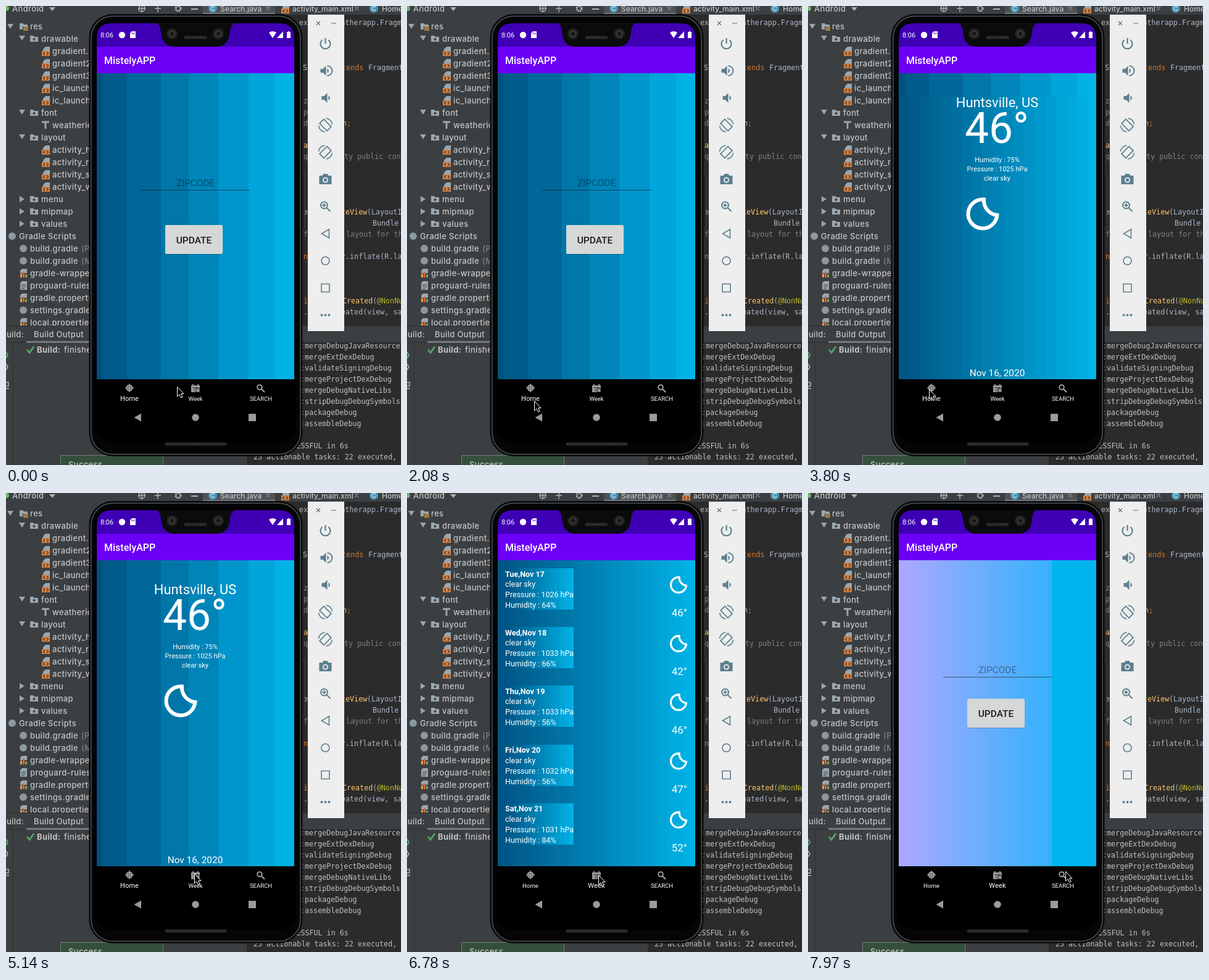
Recreate the animation shown at these times as an HTML page. Size 640 by 744 pixels, loop 8000 ms.

```html
<!DOCTYPE html>
<html lang="en">
<head>
<meta charset="utf-8">
<title>Weather app in an emulator</title>
<style>
html, body { margin: 0; width: 100%; height: 100%; overflow: hidden; background: #3c3f41 }
svg { display: block }
text { white-space: pre }
.ide { font: 500 13px Inter, sans-serif; letter-spacing: .35px; fill: #c3c5c7 }
.code { font: 11.7px "DejaVu Sans Mono", monospace }
.app { font-family: Roboto, sans-serif; fill: #fff }
</style>
</head>
<body>
<svg id="stage" width="640" height="744" viewBox="0 0 640 744"></svg>
<script>
const rect = (x, y, w, h, fill, more = '') =>
  `<rect x="${x}" y="${y}" width="${w}" height="${h}" fill="${fill}" ${more}/>`;
const circle = (x, y, r, fill, more = '') =>
  `<circle cx="${x}" cy="${y}" r="${r}" fill="${fill}" ${more}/>`;
const shape = (d, fill, more = '') => `<path d="${d}" fill="${fill}" ${more}/>`;
const line = (d, color, width = 1, more = '') =>
  `<path d="${d}" fill="none" stroke="${color}" stroke-width="${width}" ${more}/>`;
const group = (cls, body, more = '') => `<g class="${cls}" ${more}>${body}</g>`;
const at = (x, y, body) => `<g transform="translate(${x} ${y})">${body}</g>`;
const text = (x, y, str, more = '') => `<text x="${x}" y="${y}" ${more}>${str}</text>`;
const label = (x, y, str, size, more = '') =>
  text(x, y, str, `font-size="${size}" text-anchor="middle" ${more}`);

// Stepped horizontal gradient between two [r, g, b] colours
function bands(x, y, w, h, from, to, step) {
  let out = '';
  for (let dx = 0; dx < w; dx += step) {
    const k = Math.min(1, (dx + step / 2) / w);
    const rgb = from.map((c, i) => Math.round(c + (to[i] - c) * k));
    out += rect(x + dx, y, Math.min(step, w - dx), h, `rgb(${rgb})`);
  }
  return `<g shape-rendering="crispEdges">${out}</g>`;
}
const DEEP = [0, 83, 130], SKY = [0, 180, 232];

// ---- IDE behind the phone ----
const folder = y => at(39, y, shape('M0-5H5L7-3H13V5H0Z', '#9aa7b0') + circle(6.5, 1, 2, '#3c3f41'));
const file = (x, y) => at(x, y,
  shape('M6-7H13V0H2V-3Z', '#9aa7b0') + rect(0, 0, 13, 8, '#d9803f') +
  line('M5 1.5L2.5 4L5 6.5M8 1.5L10.5 4L8 6.5', '#3c3f41', 1.2));
const chart = y => at(22, y,
  shape('M4-7H12V0H1V-4Z', '#9aa7b0') + rect(1, 1, 3, 6, '#e0a44a') +
  rect(5, -2, 3, 9, '#d9603f') + rect(9, 2, 3, 5, '#76a95b'));
const arrow = (x, y, open) => shape(open
  ? `M${x - 5} ${y - 4}h10l-5 8z` : `M${x - 3} ${y - 5}v10l8-5z`, '#a0a3a5');

function projectTree() {
  const rows = [
    ['root', 'res'], ['open', 'drawable'],
    ['xml', 'gradient.'], ['xml', 'gradient2'], ['xml', 'gradient3'], ['xml', 'ic_launch'], ['xml', 'ic_launch'],
    ['open', 'font'], ['type', 'weathericons'], ['open', 'layout'],
    ['xml', 'activity_h'], ['xml', 'activity_r'], ['xml', 'activity_s'], ['xml', 'activity_w'],
    ['shut', 'menu'], ['shut', 'mipmap'], ['shut', 'values'],
    ['scripts', 'Gradle Scripts'], ['build', 'build.gradle', '(P'], ['build', 'build.gradle', '(M'],
    ['chart', 'gradle-wrapper'], ['page', 'proguard-rules'], ['chart', 'gradle.properties'],
    ['build', 'settings.gradle'], ['chart', 'local.properties']
  ];
  const textX = { xml: 75, type: 75, open: 57, shut: 57, scripts: 21 };
  const icon = {
    root: y => arrow(7, y, true) + at(22, y, shape('M0-5H5L7-3H13V5H0Z', '#9aa7b0') +
      rect(5, 0, 10, 7, '#3c3f41') + line('M6 1H14M6 3.5H14M6 6H14', '#d9a343', 1.4)),
    open: y => arrow(26, y - 1, true) + folder(y),
    shut: y => arrow(25, y, false) + folder(y),
    xml: y => file(58, y),
    type: y => line(`M58 ${y - 5}H70M64 ${y - 5}V${y + 6}`, '#9aa7b0', 3),
    scripts: y => circle(10, y, 6, '#8b989f'),
    build: y => circle(28, y, 6, '#8b989f'),
    chart,
    page: y => at(22, y, shape('M4-7H12V7H1V-4Z', '#9aa7b0') + line('M3-1H10M3 2H10M3 5H8', '#3c3f41'))
  };
  return rows.map(([kind, name, tail], i) => {
    const y = 33 + i * 20;
    return icon[kind](y) + text(textX[kind] || 39, y + 5, name) +
      (tail ? text(122, y + 5, tail, 'fill="#7d8083"') : '');
  }).join('');
}

function codeLines() {
  const C = { w: '#a9b7c6', o: '#cc7832', g: '#808080', y: '#ffc66d', a: '#bbb529', log: '#c0c0c0' };
  const lines = [
    [27, 475, 'w', 'ex'], [27, 542.5, 'w', 'atherapp.Fragm'],
    [100, 481, 'w', 'S'], [100, 530, 'o', 'extends'], [100, 587, 'w', 'Fragment'],
    [154, 482, 'g', 'z'], [172, 482, 'g', 'p'], [190, 482, 'g', 'd'],
    [190, 545, 'w', 'n'], [190, 552, 'o', ';'],
    [226, 482, 'y', 'a'], [244, 482, 'g', 'q'], [244, 541, 'g', 'pty public con'],
    [334, 482, 'w', 'e'], [334, 543, 'y', 'teView'], [334, 585, 'w', '(LayoutI'],
    [352, 594, 'w', 'Bundle'], [370, 482, 'g', 'f'], [370, 551, 'g', 'layout for th'],
    [406, 482, 'o', 'n'], [406, 543, 'w', 'r.inflate(R.la'],
    [478, 482, 'o', 'i'], [478, 545, 'y', 'Created'], [478, 594, 'w', '('], [478, 601, 'a', '@NonNu'],
    [496, 482, 'w', '.'], [496, 543, 'w', 'eated(view, sa']
  ];
  const tasks = ['mergeDebugJavaResource', 'mergeExtDexDebug', 'validateSigningDebug',
    'mergeProjectDexDebug', 'mergeDebugNativeLibs', 'stripDebugDebugSymbols', 'packageDebug', 'assembleDebug'];
  tasks.forEach((task, i) => lines.push([551 + 18 * i, 477, 'log', ':' + task]));
  lines.push([713, 400, 'log', 'BUILD SUCCESSFUL in 6s'], [731, 401, 'log', '25 actionable tasks: 22 executed,']);
  return group('code', lines.map(([y, x, c, str]) => text(x, y + 4, str, `fill="${C[c]}"`)).join(''));
}

function ide() {
  const grey = '#afb1b3';
  return rect(0, 0, 640, 744, '#3c3f41') +
    rect(400, 14, 240, 504, '#2b2b2b') + rect(390, 546, 250, 198, '#2b2b2b') +
    rect(319, 0, 117, 11, '#4e5254') + rect(319, 11, 117, 3, '#747a80') +
    group('ide',
      circle(1, 4, 4, '#72b66b') + text(10, 9, 'Android') + shape('M70 2h10l-5 6z', grey) +
      circle(220, 4, 5, 'none', `stroke="${grey}" stroke-width="1.5"`) +
      line('M214 4H226M220-2V10M241 4H251M246-1V10', grey, 1.4) +
      circle(279, 4, 4, 'none', `stroke="${grey}" stroke-width="3" stroke-dasharray="2.2 1"`) +
      line('M300 5H311', grey, 2) +
      circle(335, 4, 7, '#4595b8') + label(335, 8, 'C', 11, 'fill="#dce9ee"') +
      text(347, 9, 'Search.java', 'font-size="12" style="letter-spacing:0"') +
      line('M422 1l6 6m0-6l-6 6M565 1l6 6m0-6l-6 6', '#8c9092', 1.2) +
      file(446, 4) + text(464, 9, 'activity_main.xml', 'font-size="12" style="letter-spacing:0"') +
      circle(596, 4, 7, '#4595b8') + label(596, 8, 'C', 11, 'fill="#dce9ee"') +
      text(609, 9, 'Home', 'font-size="12" style="letter-spacing:0"') +
      projectTree() +
      rect(0, 518, 640, 28, '#3c3f41') + line('M0 518.5H640M0 545.5H640M11.5 546V744', '#2d2f31') +
      text(-8, 537, 'Build:') + text(45, 537, 'Build Output') + rect(33, 543, 108, 3, '#747a80') +
      line('M34 557L38 562L45 552', '#59a869', 2.6) +
      text(50, 562, 'Build:', 'font-weight="700"') + text(94, 562, 'finished') +
      line('M0 561L3 566L0 571', '#59a869', 2) + line('M0 580L3 585L0 590M0 610h4v6h-4M0 620h5', grey, 1.5) +
      rect(88.5, 728.5, 166, 20, '#344f3b', 'stroke="#6b8270"') + text(101, 748, 'Success')) +
    codeLines();
}

function emulatorPanel() {
  const ink = '#5c7f8e';
  const speaker = 'M-8-3H-4L1-8V8L-4 3H-8Z';
  const rotate = flip => `<g transform="scale(${flip} 1)">` +
    rect(-4.8, -8.5, 9.6, 17, 'none', `stroke="${ink}" stroke-width="1.8" transform="rotate(-45)"`) +
    line('M1-11A11 11 0 0 1 11-1M-11 1A11 11 0 0 0-1 11', ink, 1.6) + '</g>';
  const icons = [
    line('M-5-6A8 8 0 1 0 5-6M0-9V0', ink, 2.2),
    shape(speaker, ink) + shape('M3-4A4.5 4.5 0 0 1 3 4Z', ink) + line('M3-8A8 8 0 0 1 3 8', ink, 2),
    shape(speaker, ink, 'transform="translate(2 0)"') + shape('M5-4A4.5 4.5 0 0 1 5 4Z', ink),
    rotate(1), rotate(-1),
    shape('M-10-6H-5L-3-9H3L5-6H10V8H-10Z', ink) + circle(0, 1, 4.5, '#eee') + circle(0, 1, 2.7, ink),
    circle(-2, -2, 5.5, 'none', `stroke="${ink}" stroke-width="2"`) + line('M2 2L8 8M-5-2H1M-2-5V1', ink, 2),
    line('M6-7V7L-6 0Z', ink, 1.6),
    circle(0, 0, 6.5, 'none', `stroke="${ink}" stroke-width="1.6"`),
    line('M-6.5-6.5H6.5V6.5H-6.5Z', ink, 1.6),
    [-6, 0, 6].map(x => circle(x, 0, 2, ink)).join('')
  ];
  return rect(489, 14, 59, 513, '#eeeeee') +
    line('M503 25l6 6m0-6l-6 6M527 28h8', '#56727e', 1.2) +
    icons.map((icon, i) => at(517.5, 61 + 44 * i, icon)).join('');
}

// ---- phone ----
function phone() {
  const lens = x => circle(x, 45, 9, '#20201f') + circle(x, 45, 6, '#35322f') + circle(x, 45, 3, '#151515');
  const grille = (x, y, w) => rect(x, y, w, 6, '#191919', 'rx="2"') +
    line(`M${x + 2} ${y + 3}h${w - 4}`, '#3b3b3b', 3, 'stroke-dasharray="2 1"');
  return rect(480, 272, 4, 88, '#1d1e20', 'stroke="#55585a" stroke-width=".7"') +
    rect(134.5, 13, 346, 717, '#0b0b0c', 'rx="38"') +
    rect(138, 16.5, 339, 710, '#050505', 'rx="35" stroke="#505254" stroke-width="1.5"') +
    rect(144, 24, 326, 684, '#000', 'rx="27"') +
    shape('M147 66V52Q147 28 171 28H443Q467 28 467 52V66Z', '#3f00b5') +
    shape('M240 27Q250 28 251 42Q253 66 274 66H340Q361 66 363 42Q364 28 374 27Z', '#0b0b0b') +
    rect(147, 66, 320, 43, '#6c00f7') +
    lens(269) + lens(344) + grille(288, 48, 38) + grille(257, 707, 101) +
    group('app',
      text(153, 51, '8:06', 'font-size="11"') + circle(188, 47, 5.2, '#fff') +
      shape('M204 41h6v11h-9v-8z', '#fff') + line('M204 43v3m2-3v3m2-3v3', '#3f00b5', .8) +
      shape('M426 43Q432 39 438 43L432 52Z', '#fff') + shape('M449 41V52H439Z', '#fff') +
      shape('M455 42h2v-1h2v1h2v10h-6z', '#fff') +
      text(159, 94, 'MistelyAPP', 'font-size="16" font-weight="500"'));
}

function navigation() {
  const ink = '#9b9b9b';
  return group('app',
    circle(200, 619, 4.5, '#686868', `stroke="${ink}" stroke-width="2"`) +
    line('M193 619h14M200 612v14', ink, 1.5) +
    shape('M300 615h14v11h-14z', ink) + line('M303 613v3m8-3v3', ink, 2) +
    line('M302 618.5h10M305 620v5', '#333', 1) + rect(308, 620, 6, 6, ink, 'stroke="#111"') +
    circle(411, 618, 3.8, 'none', `stroke="${ink}" stroke-width="2"`) + line('M414 621l5 5', ink, 2.4) +
    label(413, 640, 'SEARCH', 9.5) +
    `<g id="navHome">${label(200, 640, 'Home', 11.1) + label(307, 640, 'Week', 9.5)}</g>` +
    `<g id="navWeek">${label(200, 640, 'Home', 9.6) + label(307, 640, 'Week', 11.4)}</g>` +
    shape('M219 660.5V673.5L207.5 667Z', ink) + circle(307, 667, 5.8, ink) + rect(393, 661, 12, 12, ink));
}

const wideBands = () => {
  const edges = [147, 157, 196, 251, 296, 344, 393, 436, 467];
  const colors = ['#00527d', '#005a8a', '#006798', '#0077a8', '#0085b9', '#0096cb', '#00a5da', '#00b2e6'];
  return colors.map((c, i) => rect(edges[i], 109, edges[i + 1] - edges[i], 496, c)).join('');
};
const fineBands = step => bands(147, 109, 320, 496, DEEP, SKY, step);
const moon = (x, y, scale) => line('M2-23.5A23.5 23.5 0 1 0 23.4 2A24 24 0 0 1 2-23.5Z', '#fff', 6,
  `transform="translate(${x} ${y}) scale(${scale})"`);

const searchPage = buttonY =>
  label(307, 292, 'ZIPCODE', 15.3, 'fill="#000" fill-opacity=".4"') +
  rect(219, 298, 176, 1, '#000', 'fill-opacity=".5"') +
  rect(258, buttonY + 1, 93, 47, '#000', 'rx="2" fill-opacity=".25"') +
  rect(258, buttonY, 93, 47, '#d6d7d7', 'rx="2"') +
  label(304.5, buttonY + 29.5, 'UPDATE', 15.5, 'fill="#1c1c1c" font-weight="500"');

const homePage = () =>
  label(306.5, 164, 'Huntsville, US', 21.9) + label(306, 222, '46°', 69.5) +
  label(306.5, 253, 'Humidity : 75%', 11) + label(306.5, 268, 'Pressure : 1025 hPa', 11) +
  label(306.5, 283, 'clear sky', 11) + moon(283, 337, 1) + label(306.5, 600, 'Nov 16, 2020', 15.4);

const weekPage = () => [
  ['Tue,Nov 17', 1026, 64, 46], ['Wed,Nov 18', 1033, 66, 42], ['Thu,Nov 19', 1033, 56, 46],
  ['Fri,Nov 20', 1032, 56, 47], ['Sat,Nov 21', 1031, 84, 52]
].map(([day, pressure, humidity, temp], i) => at(0, 95.2 * i,
  bands(159, 122, 111, 67, DEEP, SKY, 8) +
  group('', text(159, 135.5, day, 'font-weight="700"') + text(159, 152, 'clear sky') +
    text(159, 169, `Pressure : ${pressure} hPa`) + text(159, 186, `Humidity : ${humidity}%`), 'font-size="12.5"') +
  moon(440, 149, .53) + text(454, 200, temp + '°', 'font-size="16.9" text-anchor="end"'))).join('');

// Each screen stays until the next one's start time
const screens = [
  [0, wideBands() + searchPage(355)],
  [2970, wideBands()],
  [3650, wideBands() + bands(147, 147, 320, 458, DEEP, SKY, 17) + homePage()],
  [3950, wideBands() + homePage()],
  [5890, fineBands(13) + weekPage()],
  [7970, bands(147, 109, 248, 496, [173, 168, 255], [52, 178, 252], 11) +
    rect(395, 109, 72, 496, '#00b4f0') + searchPage(333.5)]
];

// Pointer positions: time, x, y
const pointer = [
  [0, 277, 617], [140, 266, 618], [290, 232, 619], [440, 206, 618], [590, 197, 618],
  [2080, 206, 640], [2230, 219, 653], [2380, 213, 646], [2530, 200, 627], [2670, 196, 621],
  [3950, 205, 622], [4100, 243, 624], [4240, 284, 617], [4390, 299, 611],
  [4690, 301, 608], [4840, 304, 611], [4990, 305, 615], [5140, 305, 617],
  [6640, 310, 619], [6790, 328, 625], [6940, 355, 628], [7080, 384, 625],
  [7230, 405, 618], [7380, 414, 614], [7520, 417, 613]
];

const byId = id => document.getElementById(id);
byId('stage').innerHTML = ide() + phone() +
  screens.map(([, body], i) => group('app', body, `id="screen${i}"`)).join('') +
  navigation() + emulatorPanel() +
  `<path id="pointer" d="M.5.5V16L4 12.7L6.5 18L9 17L6.7 11.6H11Z" fill="#000" stroke="#fff"/>`;

const show = (id, on) => byId(id).setAttribute('visibility', on ? 'visible' : 'hidden');

function draw() {
  const t = performance.now() % 8000;
  const current = screens.findLastIndex(([start]) => t >= start);
  screens.forEach((_, i) => show('screen' + i, i === current));
  show('navHome', t < 5890);
  show('navWeek', t >= 5890);
  const [, x, y] = pointer.findLast(([start]) => t >= start);
  byId('pointer').setAttribute('transform', `translate(${x} ${y})`);
  requestAnimationFrame(draw);
}
draw();
</script>
</body>
</html>
```
